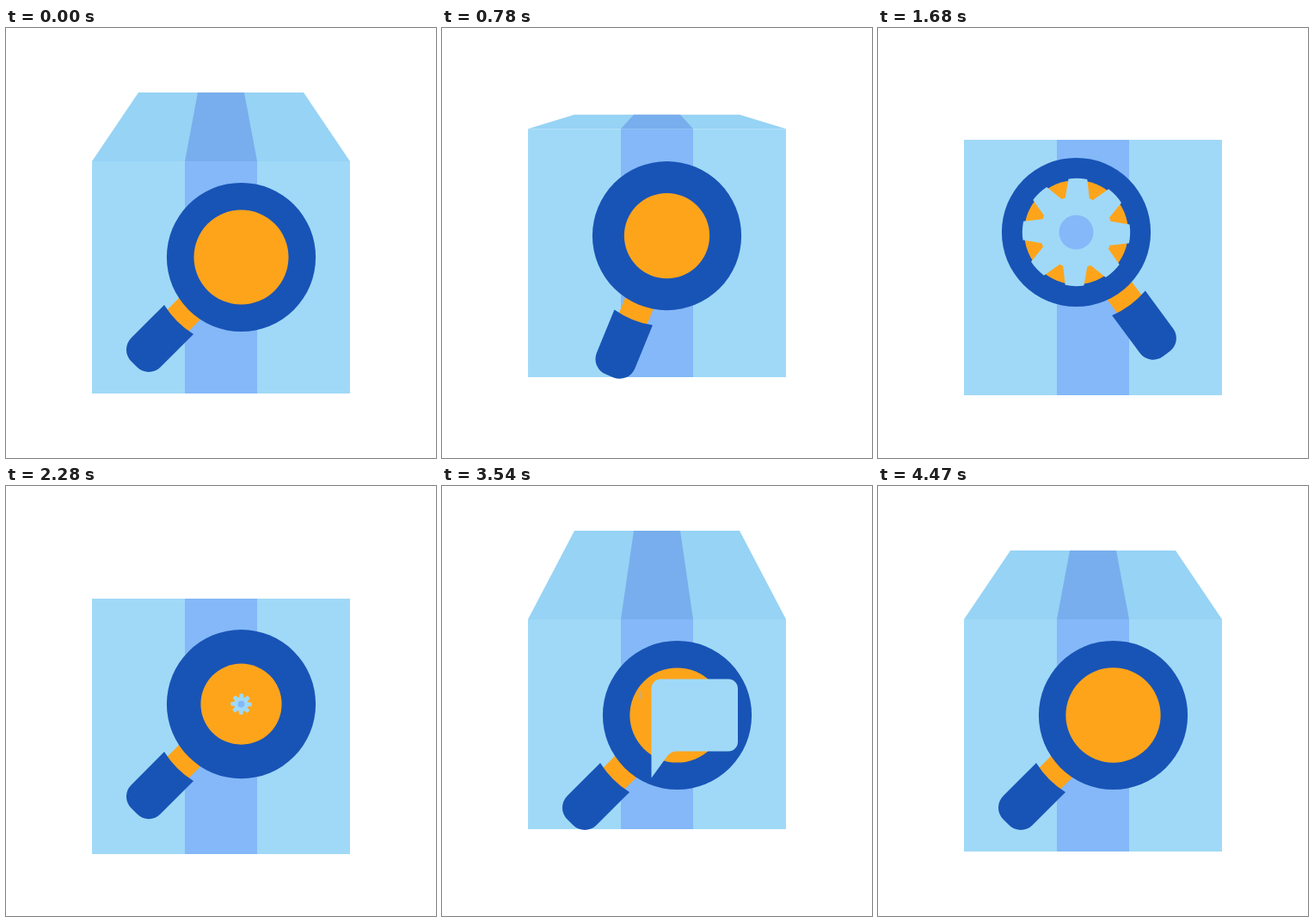
Recreate the animation shown at these times as an HTML page with a canvas. Size 500 px wide and 500 px high, loop 4.5 s.

```html
<!DOCTYPE html>
<html lang="en">
<head>
<meta charset="utf-8">
<title>Box inspection</title>
<style>
  html, body { margin: 0; height: 100%; overflow: hidden; background: #fff; }
  canvas { display: block; width: 500px; height: 500px; }
</style>
</head>
<body>
<canvas id="stage" width="500" height="500"></canvas>
<script>
const ctx = document.getElementById('stage').getContext('2d');
const LOOP = 4500;
const SKY = '#a0d9f7', TAPE = '#84b8f8', FLAP = '#96d3f5', FLAP_TAPE = '#78aeed';
const NAVY = '#1854b6', ORANGE = '#fea41b';

const rad = degrees => degrees * Math.PI / 180;
const progress = (t, from, to) => Math.min(1, Math.max(0, (t - from) / (to - from)));
// ease runs 0 to 1, bump runs 0 to 1 and back to 0.
const ease = (t, from, to) => (1 - Math.cos(Math.PI * progress(t, from, to))) / 2;
const bump = (t, from, to) => Math.sin(Math.PI * progress(t, from, to)) ** 2;

// Crouch and leap shared by the box and the lens.
const leap = t => 28 * bump(t, 430, 740) - 100 * bump(t, 660, 1560);
const gearSize = t => ease(t, 1120, 1450) - ease(t, 2040, 2380);
const bubbleSize = t => ease(t, 3250, 3530) - ease(t, 4130, 4460);
// The last line leaves first.
const lineSize = (t, i) => ease(t, 2480, 3035) - ease(t, 3300 - 40 * i, 3570 - 40 * i);

function polygon(color, ...points) {
  ctx.fillStyle = color;
  ctx.beginPath();
  points.forEach(p => ctx.lineTo(...p));
  ctx.closePath();
  ctx.fill();
}

function disc(color, radius) {
  ctx.fillStyle = color;
  ctx.beginPath();
  ctx.arc(0, 0, radius, 0, 2 * Math.PI);
  ctx.fill();
}

function rect(color, x, y, w, h) {
  ctx.fillStyle = color;
  ctx.fillRect(x, y, w, h);
}

function at(x, y, degrees, scale, draw) {
  if (scale < 0.001) return;
  ctx.save();
  ctx.translate(x, y);
  ctx.rotate(rad(degrees));
  ctx.scale(scale, scale);
  draw();
  ctx.restore();
}

function drawBox(t) {
  const open = 1 - ease(t, 494, 885) + ease(t, 2860, 3460);
  const stretch = bump(t, 60, 885) + bump(t, 3220, 3860);
  const hop = leap(t) + 23 * bump(t, 2250, 2720) - 19 * bump(t, 2600, 3080);
  const front = 297 - 27 * open - 26 * stretch;
  const bottom = 427 - 2 * open - 26 * stretch + hop;
  const fold = bottom - front, top = fold - 80 * open - 23 * stretch;
  rect(SKY, 100, fold, 300, front);
  rect(TAPE, 208, fold, 84, front);
  polygon(FLAP, [154, top], [346, top], [400, fold], [100, fold]);
  polygon(FLAP_TAPE, [223, top], [277, top], [292, fold], [208, fold]);
}

function drawHandle() {
  rect(ORANGE, -17.6, 80, 35.2, 28);
  ctx.fillStyle = NAVY;
  ctx.beginPath();
  ctx.arc(0, 0, 105.3, rad(76.8), rad(103.2));
  ctx.arcTo(-24, 176, 0, 176, 19);
  ctx.arcTo(24, 176, 24, 100, 19);
  ctx.closePath();
  ctx.fill();
}

function drawGear() {
  ctx.fillStyle = SKY;
  ctx.beginPath();
  for (let a = 0; a < 360; a += 45) {
    ctx.arc(0, 0, 62.7, rad(a - 10), rad(a + 10));
    ctx.arc(0, 0, 42, rad(a + 19.5), rad(a + 25.5));
  }
  ctx.closePath();
  ctx.fill();
  disc(TAPE, 20);
}

// The tip of the tail is the origin.
function drawBubble() {
  ctx.fillStyle = SKY;
  ctx.beginPath();
  ctx.moveTo(0, 0);
  ctx.arcTo(0, -115, 50, -115, 11);
  ctx.arcTo(100.5, -115, 100.5, -70, 11);
  ctx.arcTo(100.5, -31, 50, -31, 11);
  ctx.arcTo(22.5, -31, 0, 0, 14);
  ctx.closePath();
  ctx.fill();
}

function drawLens(t) {
  const turn = ease(t, 540, 1220) - ease(t, 1680, 2200);
  const hop = leap(t) - 72 * bump(t, 1680, 2378) + 15 * bump(t, 2378, 2950);
  const hole = 55 + 5.5 * gearSize(t) + 4.4 * lineSize(t, 0) + 1.5 * bump(t, 4200, 4500)
    - 6.5 * bump(t, 600, 1100) - 9 * bump(t, 2050, 2510);
  at(273.5 - 43 * turn, 266.5 - 29 * turn + hop, 0, 1, () => {
    at(0, 0, 45 - 81.5 * turn, 1, drawHandle);
    disc(NAVY, 86.6);
    disc(ORANGE, hole);
    at(0, 0, 0.3 * (t - 1675), gearSize(t), drawGear);
    [57, 54.5, 89].forEach((w, i) => rect(TAPE, -44.5, -27.7 + 23.4 * i, w * lineSize(t, i), 9.4));
    at(-30, 73, 0, bubbleSize(t), drawBubble);
  });
}

function frame() {
  const t = performance.now() % LOOP;
  rect('#fff', 0, 0, 500, 500);
  drawBox(t);
  drawLens(t);
  requestAnimationFrame(frame);
}
frame();
</script>
</body>
</html>
```
